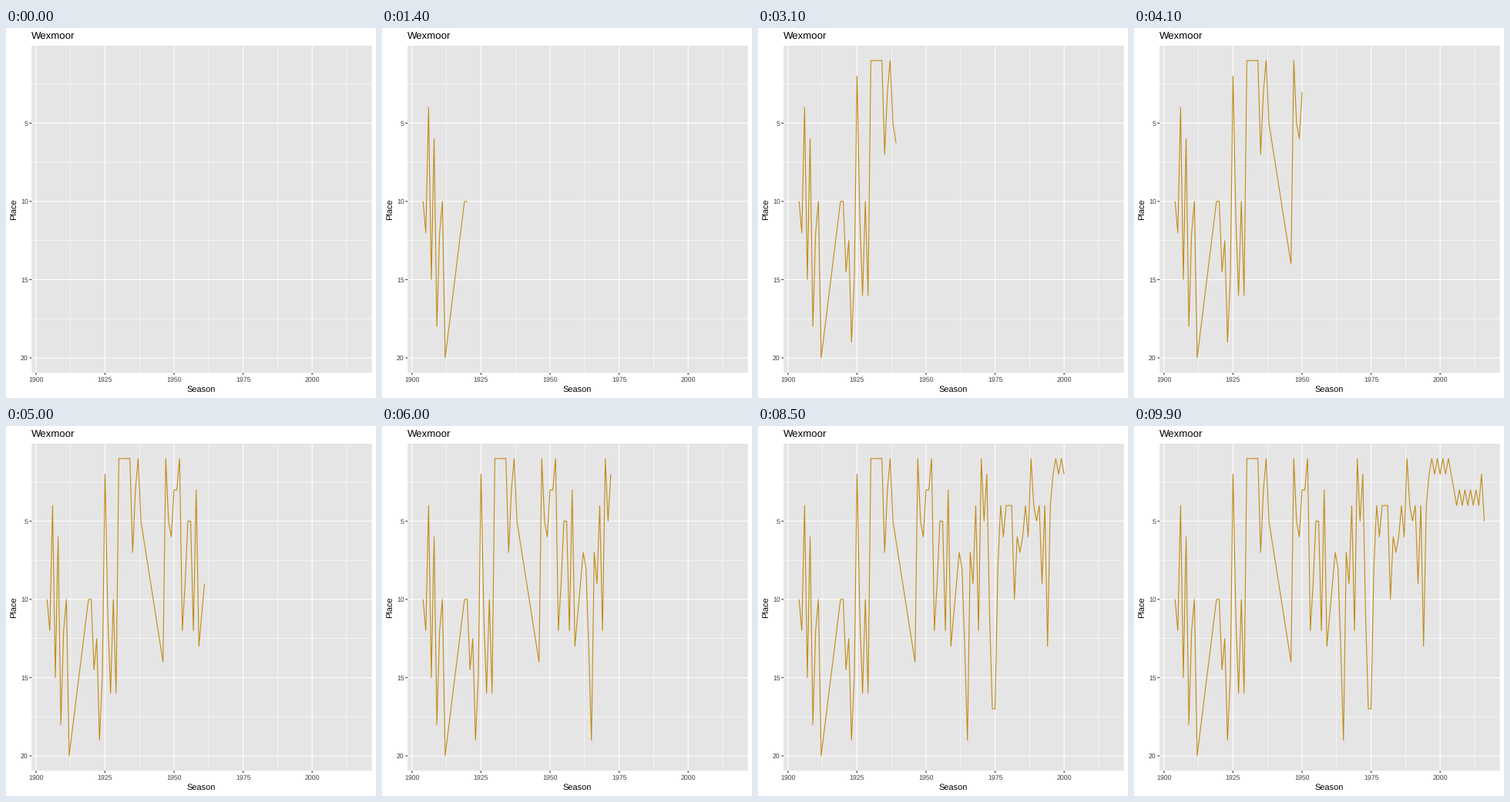
Animation, 480 px wide and 480 px high, one loop 10000 ms. Source, as a matplotlib script:

```python
import numpy as np
import matplotlib.pyplot as plt
from matplotlib.animation import FuncAnimation
from matplotlib.patches import Rectangle

plt.rcParams["font.family"] = "Liberation Sans"
plt.rcParams["text.hinting"] = "none"

SIZE, FRAMES, INTERVAL = 480, 100, 100
LEFT, RIGHT, TOP, BOTTOM = 33.2, 474.5, 22.9, 447.3
FIRST, LAST = 1904, 2016
LINE_W = 1.07


def swing(n, a, b, da=0, db=0):
    """n seasons that alternate between two places, each with its own drift."""
    return [(b + k // 2 * db) if k % 2 else (a + k // 2 * da) for k in range(n)]


def spell(start, *swings):
    """An unbroken run of seasons as (year, place) points."""
    return list(enumerate(sum(swings, []), start))


season_points = (
    spell(FIRST, swing(2, 10, 12), swing(4, 4, 15, 2, 3), swing(3, 12, 10, 8))
    + spell(1919, swing(6, 10, 10, 4.5, 2.5), swing(2, 2, 11),
            swing(3, 16, 10), swing(5, 1, 1), swing(4, 7, 3, -6, 2))
    + spell(1946, swing(2, 14, 1), swing(5, 5, 6, -2, -3),
            swing(4, 12, 9, -7, -4), swing(3, 12, 3, 1),
            swing(4, 11, 9, -4, -1), swing(2, 13, 19),
            swing(5, 7, 9, -3, 3), swing(5, 5, 2, 6, 15),
            swing(6, 8, 4, -2), swing(6, 10, 6, -3), swing(8, 1, 4, 4),
            swing(9, 2, 1), swing(10, 3, 4), swing(2, 2, 5))
)
years, places = np.array(season_points, float).T
# Each season is reached on a whole step of the animation
steps = np.round((FRAMES - 1) * (years - FIRST) / (LAST - FIRST))


def px(year):
    pad = 0.05 * (LAST - FIRST)
    return LEFT + (year - FIRST + pad) / (LAST - FIRST + 2 * pad) * (RIGHT - LEFT)


def py(place):
    return TOP + (place - 0.05) / 20.9 * (BOTTOM - TOP)


fig = plt.figure(figsize=(SIZE / 72, SIZE / 72), dpi=72, facecolor="white")
ax = fig.add_axes([0, 0, 1, 1])
ax.set_xlim(0, SIZE)
ax.set_ylim(SIZE, 0)
ax.axis("off")
ax.add_patch(Rectangle((LEFT, TOP), RIGHT - LEFT, BOTTOM - TOP,
                       fc="#e5e5e5", lw=0, snap=False))


def rule(xs, ys, width=LINE_W, color="white"):
    ax.plot(xs, ys, color=color, lw=width, solid_capstyle="butt", snap=False)


def label(x, y, text, size, color="black", ha="center", **kw):
    ax.text(x, y, text, fontsize=size, color=color, ha=ha, va="baseline", **kw)


def grid(xs, ys, width):
    for y in ys:
        rule([LEFT, RIGHT], [py(y)] * 2, width)
    for x in xs:
        rule([px(x)] * 2, [TOP, BOTTOM], width)


x_ticks, y_ticks = range(1900, 2001, 25), range(5, 21, 5)
grid(np.arange(1912.5, 2013, 25), np.arange(2.5, 18, 5), LINE_W / 2)
grid(x_ticks, y_ticks, LINE_W)

for x in x_ticks:
    rule([px(x)] * 2, [BOTTOM, BOTTOM + 2.75], color="#333333")
    label(px(x), 458.8, str(x), 8.8, "#444444")
for y in y_ticks:
    rule([LEFT - 2.75, LEFT], [py(y)] * 2, color="#333333")
    label(28.6, py(y) + 3.2, str(y), 8.8, "#444444", ha="right")

label(LEFT, 15, "Wexmoor", 13.2, ha="left")
label((LEFT + RIGHT) / 2 - 0.4, 472.1, "Season", 11)
label(14.2, (TOP + BOTTOM) / 2, "Place", 11,
      rotation=90, rotation_mode="anchor")

trace, = ax.plot([], [], color="#c1880f", lw=LINE_W, snap=False,
                 solid_capstyle="butt", solid_joinstyle="round")


def update(i):
    n = np.searchsorted(steps, i, side="right")
    xs, ys = years[:n], places[:n]
    if steps[n - 1] < i:
        t = (i - steps[n - 1]) / (steps[n] - steps[n - 1])
        xs = np.append(xs, years[n - 1] + t * (years[n] - years[n - 1]))
        ys = np.append(ys, places[n - 1] + t * (places[n] - places[n - 1]))
    trace.set_data(px(xs), py(ys))
    trace.set_visible(len(xs) > 1)
    return trace,


anim = FuncAnimation(fig, update, frames=FRAMES, interval=INTERVAL,
                     repeat=True, repeat_delay=0, blit=False)
plt.show()
```
